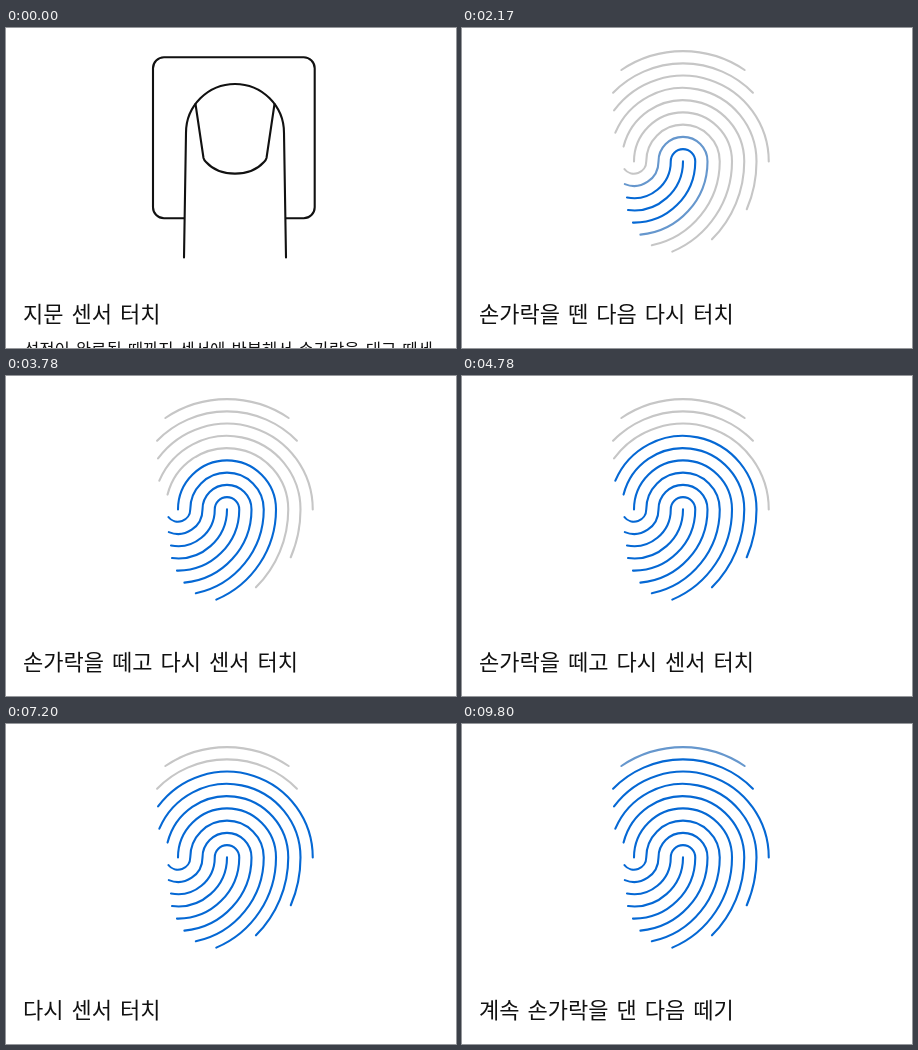
Write an HTML page that moves like this. It is 450 by 320 pixels and loops after 10000 ms.

```html
<!DOCTYPE html>
<html lang="ko">
<head>
<meta charset="utf-8">
<style>
  html, body { margin: 0; width: 100%; height: 100%; overflow: hidden; background: #fff; }
  svg { display: block; }
  text { font-family: "Noto Sans CJK KR", "Noto Sans CJK", sans-serif; word-spacing: .085em; fill: #111; }
  path, rect { fill: none; stroke-width: 2.1; stroke-linecap: round; stroke-linejoin: round; }
  #sensor * { stroke: #111; }
  #sensor .finger { fill: #fff; }
</style>
</head>
<body>
<svg width="450" height="320" viewBox="0 0 450 320">
  <g id="sensor">
    <rect x="147" y="29.3" width="161.7" height="161" rx="11"/>
    <path class="finger" d="M178 229.5L180 105A49 49 0 0 1 278 105L280 229.5"/>
    <path d="M189.5 76L197.5 130Q198 132 200 134C214 149.5 244 149.5 258 134Q260 132 260.5 130L268.5 76"/>
  </g>
  <g id="print"></g>
  <text id="caption" x="17" y="294.3" font-size="22"></text>
  <text id="hint" x="18" y="327.5" font-size="16.6">설정이 완료될 때까지 센서에 반복해서 손가락을 대고 떼세</text>
</svg>
<script>
const $ = id => document.getElementById(id);
const LOOP = 10000, PRINT_START = 765, STEP = 200.5;
const PITCH = 12.25, HOOK_X = 172, ARCH_X = 221, Y = 133.4;
const GRAY = [198, 198, 198], BLUE = [5, 104, 212];

const AGAIN = '손가락을 뗀 다음 다시 터치', TOUCH = '다시 센서 터치', LIFT = '손가락을 떼고 다시 센서 터치';
// [first step, caption]
const captions = [[-1, '지문 센서 터치'], [0, AGAIN], [8, TOUCH], [15, LIFT],
  [23, AGAIN], [30, TOUCH], [36, LIFT], [42, '계속 손가락을 댄 다음 떼기']];

// Ridge angles in degrees: hook and tail around HOOK_X, arch around ARCH_X.
const ridges = [
  { tail: 97 },
  { hook: 101, tail: 91 },
  { hook: 112, tail: 85 },
  { hook: 141, tail: 78 },
  { from: 180, tail: 67 },
  { from: 194, tail: 45 },
  { from: 203, tail: 23 },
  { from: 216.5 },
  { from: 224.5, to: 315.5 },
  { from: 236, to: 304 }
];

const polar = (x, r, deg) => {
  const a = deg * Math.PI / 180;
  return `${x + r * Math.cos(a)} ${Y + r * Math.sin(a)}`;
};
const arc = (x, r, deg, sweep) => `A${r} ${r} 0 0 ${sweep} ${polar(x, r, deg)}`;

function ridgePath({ hook, from = 180, to = 0, tail }, k) {
  const inner = (4 - k) * PITCH, arch = k * PITCH, outer = (4 + k) * PITCH;
  let d = hook ? `M${polar(HOOK_X, inner, hook)}` + arc(HOOK_X, inner, 0, 0)
               : `M${polar(ARCH_X, arch, from)}`;
  if (k) d += arc(ARCH_X, arch, to, 1);
  if (tail) d += arc(HOOK_X, outer, tail, 1);
  return d;
}

const lines = ridges.map((ridge, k) => {
  const path = document.createElementNS('http://www.w3.org/2000/svg', 'path');
  path.setAttribute('d', ridgePath(ridge, k));
  return $('print').appendChild(path);
});

// The last two ridges are filled in the second pass.
function fillStart(k, step) {
  if (k === 9) return 44;
  if (k === 8 && step >= 31) return 40;
  return 3 * k;
}

function draw(now) {
  const step = Math.floor((now % LOOP - PRINT_START) / STEP);
  const intro = step < 0;
  $('sensor').style.display = $('hint').style.display = intro ? '' : 'none';
  $('print').style.display = intro ? 'none' : '';
  $('caption').textContent = captions.findLast(([first]) => first <= Math.max(step, -1))[1];
  lines.forEach((line, k) => {
    const f = Math.min(1, Math.max(0, (step - fillStart(k, step)) / 2));
    line.style.stroke = `rgb(${GRAY.map((c, i) => Math.round(c + (BLUE[i] - c) * f))})`;
  });
}

const start = performance.now();
function tick() {
  draw(performance.now() - start);
  requestAnimationFrame(tick);
}
tick();
</script>
</body>
</html>
```
